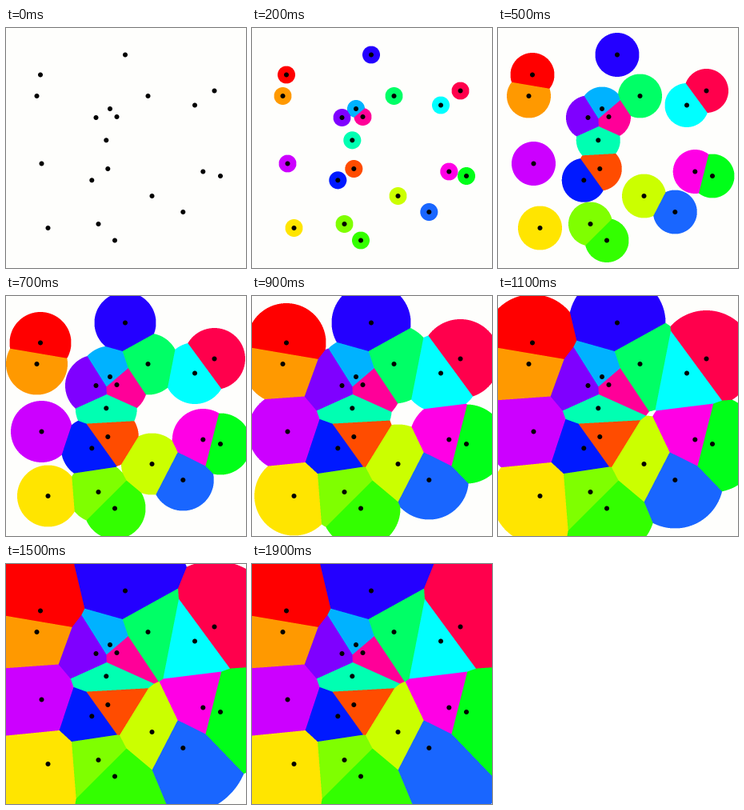
Animation of 300 by 300 pixels, one loop 2000 ms. Source, as a matplotlib script:

```python
import colorsys

import matplotlib.pyplot as plt
import numpy as np
from matplotlib.animation import FuncAnimation
from matplotlib.patches import Circle

SIZE = 300
FRAMES = 20
INTERVAL = 100
GROWTH = 5.5  # pixels of radius gained per frame
SS = 3        # samples per pixel along each axis
PAPER = np.array([254, 254, 252]) / 255

# Seeds in hue order around the colour wheel
SEEDS = [
    (43, 58.5), (127.3, 176), (38.5, 85), (52.5, 250), (182.5, 210),
    (115.5, 245), (136, 265.5), (268, 185), (177.5, 85), (125.3, 140.3),
    (236, 96.5), (130, 101), (221.3, 230), (107.3, 190.3), (149, 33.5),
    (112.5, 112), (44.5, 169.5), (246.3, 179.5), (138.5, 111), (260.5, 78.5),
]
COLORS = np.array([colorsys.hsv_to_rgb(i / len(SEEDS), 1, 1)
                   for i in range(len(SEEDS))])
COLORS[12, 0] = 0.1    # softer azure
COLORS[14, 0] = 0.145  # deeper indigo

axis = (np.arange(SIZE * SS) + 0.5) / SS
gx, gy = np.meshgrid(axis, axis)
spans = np.array([np.hypot(gx - x, gy - y) for x, y in SEEDS])
dist = spans.min(axis=0)
cells = COLORS[spans.argmin(axis=0)]


def render(i):
    """Cells clipped to the current radius, averaged down to pixels."""
    inside = (dist < GROWTH * i)[..., None]
    fine = np.where(inside, cells, PAPER)
    return fine.reshape(SIZE, SS, SIZE, SS, 3).mean(axis=(1, 3))


fig = plt.figure(figsize=(3, 3), dpi=100, facecolor=PAPER)
ax = fig.add_axes([0, 0, 1, 1])
ax.axis("off")
image = ax.imshow(render(0), extent=(0, SIZE, SIZE, 0),
                  interpolation="nearest", aspect="auto")
for seed in SEEDS:
    ax.add_patch(Circle(seed, 3, facecolor="black", linewidth=0, zorder=2))
ax.set_xlim(0, SIZE)
ax.set_ylim(SIZE, 0)


def update(i):
    image.set_data(render(i))
    return [image]


anim = FuncAnimation(fig, update, frames=FRAMES, interval=INTERVAL,
                     init_func=lambda: update(0), repeat=True,
                     repeat_delay=0, blit=False)
plt.show()
```
